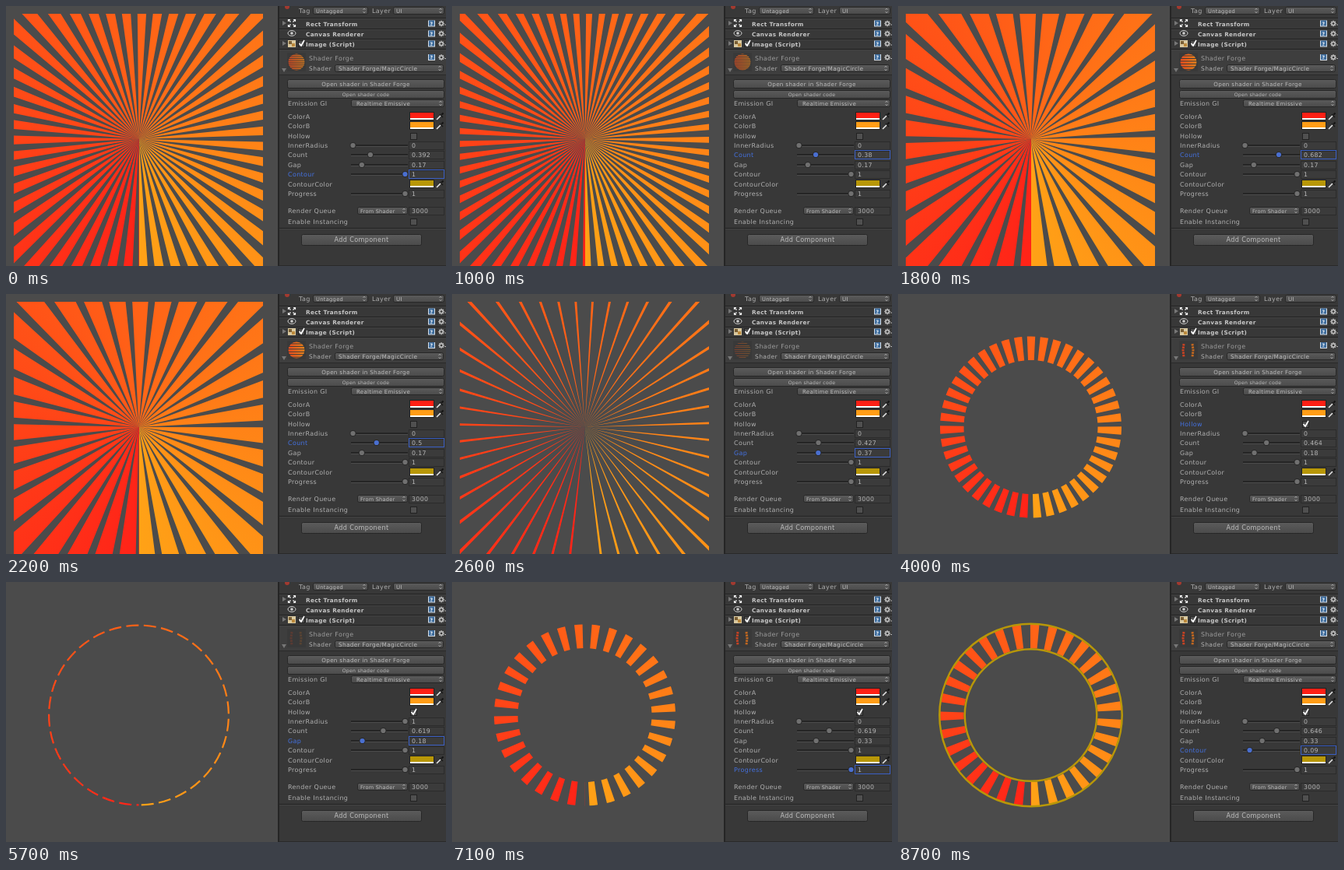
An HTML page with a canvas that plays this animation: 565 px wide and 334 px high, repeating every 9100 ms.

```html
<!DOCTYPE html>
<html lang="en">
<head>
<meta charset="utf-8">
<title>Shader inspector</title>
<style>
html, body { margin: 0; width: 565px; height: 334px; overflow: hidden; background: #4b4b4b; }
canvas { display: block; }
</style>
</head>
<body>
<canvas id="stage" width="565" height="334"></canvas>
<script>
const g = document.getElementById('stage').getContext('2d');
const LOOP = 9100, CX = 170.5, CY = 171, RAD = Math.PI / 180, UNIT = 18.02;
const RED = '#ff2318', ORANGE = '#ffa216', GOLD = '#b89708', TEXT = '#b0b0b0', BLUE = '#4471e0';

// Keyframes as [ms, value], linear in between
const tracks = {
  count: [[300, .392], [700, .22], [1000, .38], [1500, .38], [1700, .58], [1800, .682], [1900, .72],
    [2300, .427], [3500, .427], [3600, .464], [4900, .464], [5300, .619], [7800, .619], [8200, .646]],
  gap: [[2300, .17], [2600, .37], [2900, .41], [3400, .18], [5900, .18], [6200, .33]],
  phase: [[2300, 0], [2600, 1], [3400, .5], [7800, .5], [8200, 0]],
  inner: [[4300, 0], [4800, 1], [7000, 1], [7100, 0]],
  contour: [[8200, 1], [8300, .2], [8500, 0], [8700, .09]],
  progress: [[7100, 1], [7200, .93], [7300, .93], [7500, .3], [7800, 1]]
};
const focusAt = [[0, 'Contour'], [400, 'Count'], [2400, 'Gap'], [3600, 'Hollow'], [4400, 'InnerRadius'],
  [4900, 'Count'], [5700, 'Gap'], [7100, 'Progress'], [7900, 'Count'], [8300, 'Contour']];

function valueAt(keys, t) {
  if (t <= keys[0][0]) return keys[0][1];
  for (let i = 1; i < keys.length; i++) {
    const [t0, a] = keys[i - 1], [t1, b] = keys[i];
    if (t <= t1) return a + (b - a) * (t - t0) / (t1 - t0);
  }
  return keys[keys.length - 1][1];
}

function stateAt(t) {
  const s = { hollow: t >= 4000 };
  for (const name in tracks) s[name] = valueAt(tracks[name], t);
  s.drawnCount = valueAt(tracks.count, t - 100); // the view trails the slider by one step
  s.focus = focusAt.filter(k => k[0] <= t).pop()[1];
  return s;
}

function rect(x, y, w, h, fill) {
  g.fillStyle = fill;
  g.fillRect(x, y, w, h);
}

function text(str, x, y, size = 8.6, color = TEXT, align = 'left', weight = '') {
  g.font = `${weight} ${size * .93}px "DejaVu Sans", sans-serif`;
  g.letterSpacing = size * .042 + 'px';
  g.textAlign = align;
  g.fillStyle = color;
  g.fillText(str, x, y);
}

function line(points, color, width = 1) {
  g.strokeStyle = color;
  g.lineWidth = width;
  g.beginPath();
  points.forEach(p => g.lineTo(...p));
  g.stroke();
}

function disc(x, y, r, color) {
  g.fillStyle = color;
  g.beginPath();
  g.arc(x, y, r, 0, 7);
  g.fill();
}

function button(x, y, w, h, label = '', size = 7.3) {
  g.beginPath();
  g.roundRect(x + .5, y + .5, w - 1, h - 1, 2);
  const shade = g.createLinearGradient(0, y, 0, y + h);
  shade.addColorStop(0, '#5c5c5c');
  shade.addColorStop(1, '#4a4a4a');
  g.fillStyle = shade;
  g.fill();
  g.strokeStyle = '#272727';
  g.lineWidth = 1;
  g.stroke();
  text(label, x + w / 2, y + h / 2 + 2.8, size, '#bebebe', 'center');
}

function dropdown(x, y, w, label, size, inset = 4) {
  button(x, y, w, 10);
  text(label, x + inset, y + 7.8, size, '#c0c0c0');
  const cx = x + w - 5, cy = y + 5;
  line([[cx - 1.5, cy - 1], [cx, cy - 3], [cx + 1.5, cy - 1]], '#aaa', .8);
  line([[cx - 1.5, cy + 1], [cx, cy + 3], [cx + 1.5, cy + 1]], '#aaa', .8);
}

function field(y, value, focused) {
  rect(517, y - 5, 46, 11, '#2b2b2b');
  rect(518, y - 4, 44, 9, '#3b3b3b');
  if (focused) {
    g.strokeStyle = '#3a5fc4';
    g.lineWidth = 1;
    g.strokeRect(517.5, y - 5.5, 45, 11);
  }
  text(value, 521, y + 3, 8.4, '#b8b8b8');
}

function slider(name, y, knob, value, focus) {
  const on = name === focus;
  text(name, 362, y + 3, 8.6, on ? BLUE : TEXT);
  rect(443, y - 1, 73, 2, '#252525');
  rect(443, y + 1, 73, 1, '#4c4c4c');
  disc(knob, y, 4, '#2a2a2a');
  disc(knob, y, 3.1, on ? '#4a6fd0' : '#707070');
  field(y, value, on);
}

function swatch(name, y, color) {
  text(name, 362, y + 3);
  rect(518, y - 6, 32, 11, '#222');
  rect(519, y - 5, 30, 7, color);
  rect(519, y + 2, 30, 2, '#fff');
  line([[553, y + 4], [559, y - 2]], '#e4e4e4', 1.6);
  line([[557, y - 3], [561, y + 1]], '#151515', 1.2);
  line([[559, y - 2], [561.5, y - 4.5]], '#151515', 2.2);
}

function check(y, on) {
  rect(519, y - 4, 9, 9, '#222');
  rect(520, y - 3, 7, 7, '#505050');
  if (on) line([[520.5, y], [523, y + 3], [527, y - 4]], '#fff', 1.7);
}

function helpIcons(y) {
  rect(542, y - 4, 9, 8, '#d5dde6');
  rect(543, y - 4, 7, 7, '#3f6d9d');
  text('?', 546.5, y + 2.3, 6.5, '#fff', 'center', 'bold');
  disc(559, y, 3, '#b8b8b8');
  for (let a = 0; a < 360; a += 45) {
    disc(559 + 3.2 * Math.cos(a * RAD), y + 3.2 * Math.sin(a * RAD), .8, '#b8b8b8');
  }
  disc(559, y, 1.3, '#383838');
  rect(563, y + 1, 2, 1, '#aaa');
}

function arrow(x, y, open) {
  g.fillStyle = '#777';
  g.beginPath();
  if (open) { g.moveTo(x - 3, y - 2); g.lineTo(x + 3, y - 2); g.lineTo(x, y + 3); }
  else { g.moveTo(x - 2, y - 3); g.lineTo(x + 3, y); g.lineTo(x - 2, y + 3); }
  g.fill();
}

// Bars run counter-clockwise from the bottom; count and gap are in units of UNIT degrees
function bars(s, r0, r1) {
  const hue = g.createConicGradient(Math.PI / 2, CX, CY);
  hue.addColorStop(0, RED);
  hue.addColorStop(1, ORANGE);
  g.fillStyle = hue;
  const period = s.drawnCount * UNIT, gap = s.gap * UNIT, end = 360 * s.progress;
  if (gap >= period) return;
  g.beginPath();
  for (let a = gap * s.phase; a < end; a += period) {
    const from = (90 - a) * RAD, to = (90 - Math.min(a + period - gap, end)) * RAD;
    g.moveTo(CX + r0 * Math.cos(from), CY + r0 * Math.sin(from));
    g.arc(CX, CY, r1, from, to, true);
    g.arc(CX, CY, r0, to, from);
    g.closePath();
  }
  g.fill();
}

function circle(s) {
  if (!s.hollow) {
    g.save();
    g.beginPath();
    g.rect(10, 10, 320, 324);
    g.clip();
    bars(s, 0, 240);
    g.restore();
    return;
  }
  const r0 = 86 + 28.3 * s.inner, r1 = 116.5;
  bars(s, r0, r1);
  const w = 4 - 17 * s.contour;
  if (w <= 0) return;
  g.strokeStyle = GOLD;
  g.lineWidth = w;
  for (const r of [r0 - w / 2, r1 - .5 + w / 2]) {
    g.beginPath();
    g.arc(CX, CY, r, 0, 7);
    g.stroke();
  }
}

// Small material ball: the pattern wraps into horizontal bands
function preview(s) {
  g.save();
  if (s.hollow) {
    g.globalAlpha = .85 - .65 * s.inner;
    g.setLineDash([2.5, 1]);
    line([[367, 64], [366, 72], [367, 81]], '#e04420', 3);
    line([[378, 64], [379, 72], [378, 81]], '#d9701c', 3);
  } else {
    g.beginPath();
    g.arc(373, 72, 10.5, 0, 7);
    g.clip();
    const hue = g.createLinearGradient(362, 0, 384, 0);
    hue.addColorStop(0, '#f04a1c');
    hue.addColorStop(1, '#e8861a');
    const step = s.drawnCount * 6, h = Math.max(0, step - s.gap * 6);
    for (let y = 61; y < 83; y += step) rect(362, y, 22, h, hue);
  }
  g.restore();
}

function header() {
  disc(361, 1, 3, '#a33a30');
  text('Tag', 376, 9);
  dropdown(394, 1, 71, 'Untagged', 7.2);
  text('Layer', 470, 9);
  dropdown(497, 1, 66, 'UI', 7.6);
  for (const y of [15, 29, 42, 55]) {
    rect(351, y, 214, 1, '#222');
    rect(351, y + 1, 214, 1, '#434343');
  }
  [['Rect Transform', 22.5], ['Canvas Renderer', 35.5], ['Image (Script)', 48.5]].forEach(([name, y]) => {
    text(name, 385, y + 3, 7.8, '#c6c6c6', 'left', 'bold');
    helpIcons(y);
  });
  arrow(357, 22);
  arrow(357, 48);
  for (const [dx, dy] of [[-1, -1], [1, -1], [-1, 1], [1, 1]]) {
    const x = 367 + dx * 4.5, y = 22 + dy * 4.5;
    line([[x - dx * 2.5, y], [x, y], [x, y - dy * 2.5]], '#eee', 1.2);
    line([[x, y], [x - dx * 3, y - dy * 3]], '#eee', 1.2);
  }
  g.strokeStyle = '#d0d0d0';
  g.lineWidth = 1;
  g.beginPath();
  g.ellipse(367, 35, 5, 3.4, 0, 0, 7);
  g.stroke();
  disc(367, 35, 1.8, '#d0d0d0');
  rect(362, 44, 10, 9, '#d9c9a0');
  rect(363, 45, 4, 4, '#7a5f35');
  rect(367, 48, 4, 4, '#bd8a3c');
  rect(375, 44, 9, 9, '#222');
  rect(376, 45, 7, 7, '#505050');
  line([[376.5, 48], [379, 51], [383, 44]], '#fff', 1.7);
}

function panel(s) {
  rect(349, 0, 2, 334, '#252525');
  rect(351, 0, 214, 334, '#383838');
  header();

  rect(351, 57, 214, 31, '#3e3e3e');
  rect(361, 60, 24, 24, '#393939');
  preview(s);
  text('Shader Forge', 389, 69.5, 8.6, '#9c9c9c');
  helpIcons(66);
  arrow(357, 82, true);
  text('Shader', 389, 83, 8.2);
  dropdown(422, 75, 140, 'Shader Forge/MagicCircle', 7.9, 5);
  rect(351, 88, 214, 1, '#2a2a2a');

  button(361, 94, 202, 12, 'Open shader in Shader Forge', 7.7);
  button(361, 108, 202, 11, 'Open shader code', 6.6);
  text('Emission GI', 362, 128);
  dropdown(443, 120, 120, 'Realtime Emissive', 7.5, 7);

  swatch('ColorA', 142, '#ff2015');
  swatch('ColorB', 154, '#ff9d16');
  text('Hollow', 362, 169.5, 8.6, s.focus === 'Hollow' ? BLUE : TEXT);
  check(167, s.hollow);
  const row = (name, y, v) => slider(name, y, 445.5 + 67 * v, String(+v.toFixed(2)), s.focus);
  row('InnerRadius', 179, s.inner);
  slider('Count', 191, 439.5 + 72.5 * s.count, String(+s.count.toFixed(3)), s.focus);
  row('Gap', 204, s.gap);
  row('Contour', 216, s.contour);
  swatch('ContourColor', 229, GOLD);
  row('Progress', 241, s.progress);

  text('Render Queue', 362, 266);
  dropdown(451, 258, 65, 'From Shader', 7);
  field(263, '3000', false);
  text('Enable Instancing', 362, 280);
  check(277, false);
  rect(351, 285, 214, 1, '#222');
  rect(351, 286, 214, 1, '#434343');
  button(379, 293, 155, 15, 'Add Component', 8.7);
  rect(351, 333, 214, 1, '#2a2a2a');
}

function draw(now) {
  const s = stateAt(Math.floor(now % LOOP / 100) * 100);
  rect(0, 0, 565, 334, '#4b4b4b');
  circle(s);
  panel(s);
  requestAnimationFrame(draw);
}
requestAnimationFrame(draw);
</script>
</body>
</html>
```
